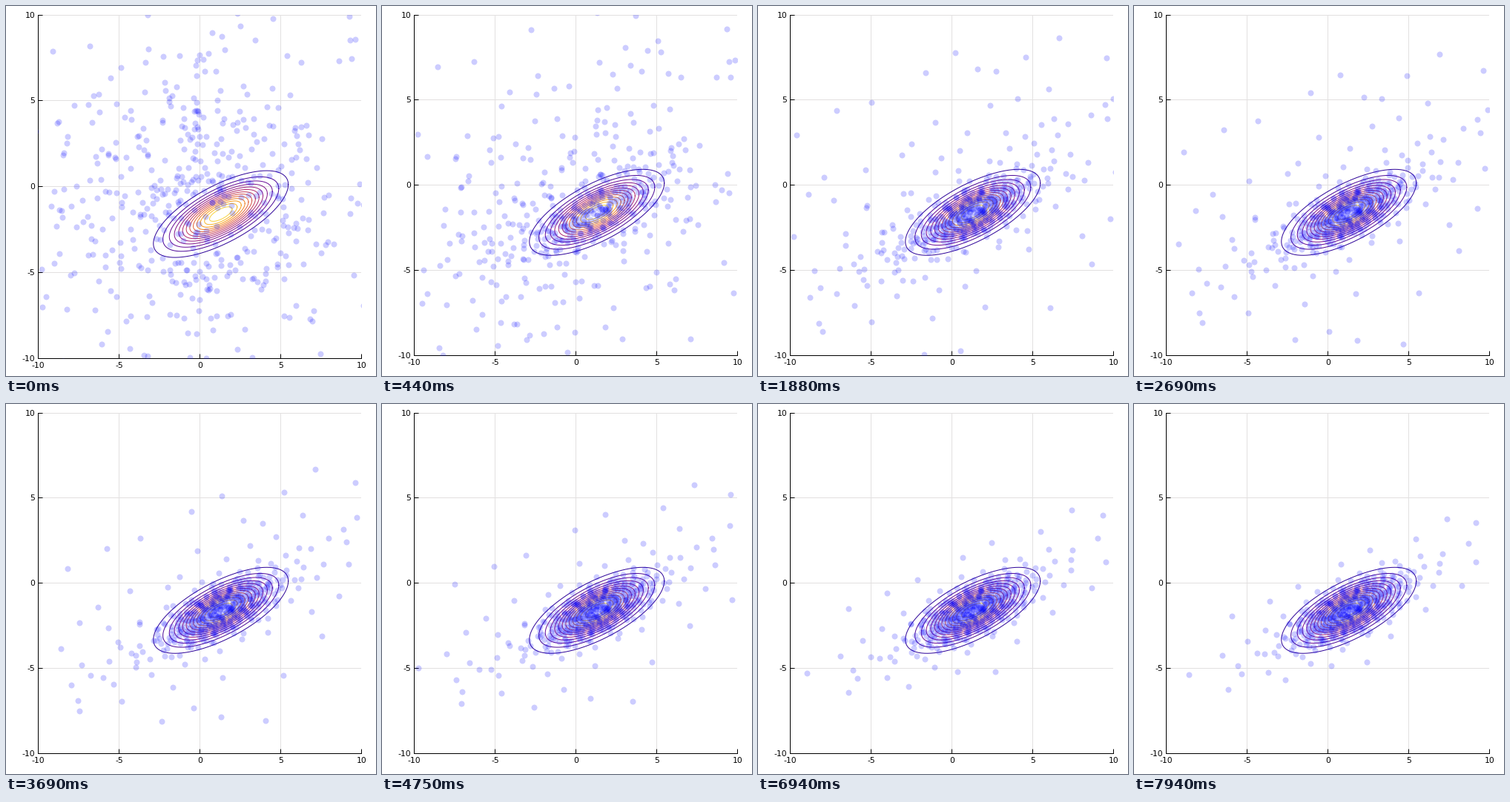
Write a matplotlib script that moves like this. It is 499 px wide and 499 px high and loops after 8000 ms.

```python
import numpy as np
import matplotlib.pyplot as plt
from matplotlib.animation import FuncAnimation
from matplotlib.colors import LinearSegmentedColormap

SIZE, DPI = 499, 100
PX = 72 / DPI
FRAMES, INTERVAL = 128, 62.5
PARTICLES, SPREAD = 500, 5
RATE, SUBSTEPS = 0.006, 3

MEAN = np.array([1.3, -1.62])
COV = np.array([[3.30, 1.36], [1.36, 1.21]])
PRECISION = np.linalg.inv(COV)
LEVELS = 14


def stein_direction(x):
    """Stein variational direction for a Gaussian, kernel exp(-r^2 / 2)."""
    sq = (x ** 2).sum(axis=1)
    k = np.exp(-np.maximum(sq[:, None] + sq - 2 * x @ x.T, 0) / 2)
    score = -(x - MEAN) @ PRECISION
    repulsion = x * k.sum(axis=1, keepdims=True) - k @ x
    return k @ score + repulsion


def simulate():
    x = np.random.default_rng(7).normal(0, SPREAD, (PARTICLES, 2))
    path = [x]
    for _ in range(FRAMES - 1):
        for _ in range(SUBSTEPS):
            x = x + RATE / SUBSTEPS * stein_direction(x)
        path.append(x)
    return path


def place_axes(bottom):
    left, right, top = 43.4, 479.4, 11.6
    ax.set_position([left / SIZE, 1 - bottom / SIZE,
                     (right - left) / SIZE, (bottom - top) / SIZE])


def draw_contours():
    cmap = LinearSegmentedColormap.from_list("heat", [
        "#30069a", "#6a0e96", "#9a2080", "#c23a5f",
        "#e5663a", "#f99a1a", "#f7d340"])
    t = np.linspace(0, 2 * np.pi, 200)
    ring = np.linalg.cholesky(COV) @ np.array([np.cos(t), np.sin(t)])
    for i in range(1, LEVELS):
        x, y = MEAN[:, None] + ring * np.sqrt(2 * np.log(LEVELS / i))
        ax.plot(x, y, color=cmap((i - 1) / (LEVELS - 2)), lw=PX, zorder=2)


plt.rcParams["font.family"] = "DejaVu Sans"
fig = plt.figure(figsize=(SIZE / DPI, SIZE / DPI), dpi=DPI, facecolor="white")
ax = fig.add_axes([0, 0, 1, 1])
place_axes(474.6)

ticks = range(-10, 11, 5)
names = [str(v) for v in ticks]
ax.set_xticks(ticks, names)
ax.set_yticks(ticks, names)
ax.set(xlim=(-10, 10), ylim=(-10, 10), autoscale_on=False)
ax.set_axisbelow(True)
ax.grid(color="#e2e0e0", lw=PX)
ax.tick_params(direction="in", length=6 * PX, width=PX, labelsize=10.7 * PX)
ax.tick_params(axis="x", pad=5 * PX)
ax.tick_params(axis="y", pad=4 * PX)
for side, spine in ax.spines.items():
    spine.set_visible(side in ("left", "bottom"))
    spine.set_linewidth(PX)

draw_contours()
path = simulate()
dots = ax.scatter(*path[0].T, s=(8 * PX) ** 2, color="blue", alpha=0.2,
                  linewidths=0, zorder=3)


def update(i):
    place_axes(474.6 if i == 0 else 470.6)
    dots.set_offsets(path[i])
    return [dots]


ani = FuncAnimation(fig, update, frames=FRAMES, interval=INTERVAL,
                    init_func=lambda: update(0), repeat=True, repeat_delay=0,
                    blit=False)
plt.show()
```
